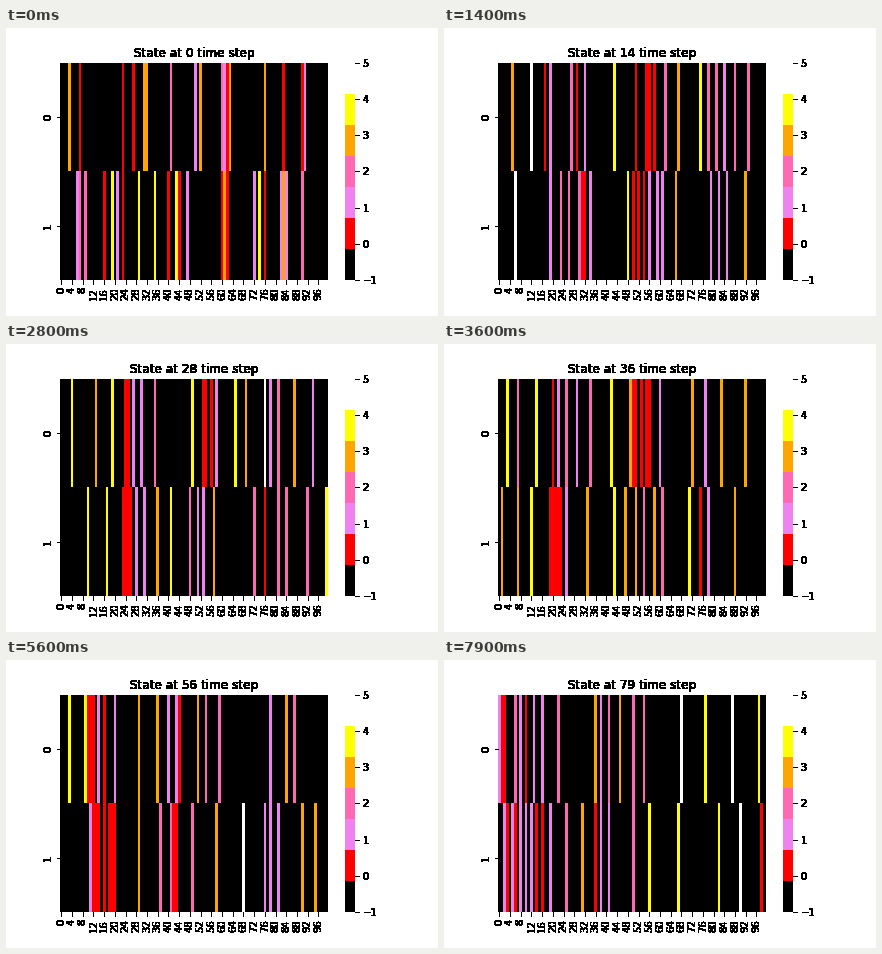
These frames come from a looping animation (432x288 px, 8000 ms). A matplotlib script:

```python
import numpy as np
import matplotlib.pyplot as plt
from matplotlib.animation import FuncAnimation
from matplotlib.colors import ListedColormap

CELLS, LANES, STEPS = 100, 2, 80
V_MAX, P_SLOW, SAFE_BEHIND = 5, 0.5, 2
EMPTY = -1
COLORS = ["black", "red", "violet", "hotpink", "orange", "yellow", "white"]

# Starting cells of the cars, by lane and speed.
START = [
    {0: [7, 23, 27, 62, 83, 90], 1: [50, 61, 91], 2: [41, 60],
     3: [3, 31, 32, 52, 63, 76]},
    {0: [16, 23, 40, 44, 60, 62, 76], 1: [6, 21, 47, 72, 82, 84],
     2: [7, 9, 90], 3: [61, 83], 4: [19, 29, 35, 43, 74]},
]


def first_road():
    road = np.full((LANES, CELLS), EMPTY)
    for lane, speeds in enumerate(START):
        for v, cells in speeds.items():
            road[lane, cells] = v
    return road


def gap(lane, x, step=1):
    """Free cells next to x, ahead (step 1) or behind (step -1)."""
    for d in range(1, CELLS):
        if lane[(x + step * d) % CELLS] != EMPTY:
            return d - 1
    return CELLS - 1


def change_lanes(road):
    out = road.copy()
    for k, x in np.argwhere(road != EMPTY):
        v, other = road[k, x], 1 - k
        ahead = gap(road[k], x)
        if (road[other, x] == EMPTY and ahead < v + 1
                and gap(road[other], x) > ahead
                and gap(road[other], x, -1) >= SAFE_BEHIND):
            out[k, x], out[other, x] = EMPTY, v
    return out


def drive(road, rng):
    out = np.full_like(road, EMPTY)
    for k, x in np.argwhere(road != EMPTY):
        v = min(road[k, x] + 1, V_MAX, gap(road[k], x))
        if v > 0 and rng.random() < P_SLOW:
            v -= 1
        out[k, (x + v) % CELLS] = v
    return out


def simulate():
    rng = np.random.default_rng(4)
    roads = [first_road()]
    while len(roads) < STEPS:
        roads.append(drive(change_lanes(roads[-1]), rng))
    return roads


def hard_edges(image, dpi):
    """Turn every touched pixel solid black."""
    solid = np.zeros_like(image)
    solid[..., 3] = image[..., 3] > 0
    return solid, 0, 0


roads = simulate()

plt.rcParams.update({"font.family": "DejaVu Sans", "font.size": 10})
fig, ax = plt.subplots(figsize=(6, 4), dpi=72)
fig.subplots_adjust(left=0.125, right=0.9, bottom=0.125, top=0.88)

mesh = ax.pcolormesh(roads[0], cmap=ListedColormap(COLORS),
                     vmin=EMPTY, vmax=V_MAX)
ax.invert_yaxis()
ax.spines[:].set_visible(False)
marks = np.arange(0, CELLS, 4)
ax.set_xticks(marks + 0.5, marks, rotation=90)
ax.set_yticks([0.5, 1.5], ["0", "1"], rotation=90, va="center")
title = ax.set_title("", fontsize=12)

bar = fig.colorbar(mesh, ax=ax, ticks=range(EMPTY, V_MAX + 1))
bar.outline.set_linewidth(0)

for artist in (title, ax.xaxis, ax.yaxis, bar.ax.yaxis):
    artist.set_agg_filter(hard_edges)


def update(i):
    mesh.set_array(roads[i])
    title.set_text(f"State at {i} time step")
    return mesh, title


anim = FuncAnimation(fig, update, frames=STEPS, interval=100,
                     repeat=True, repeat_delay=0)
plt.show()
```
